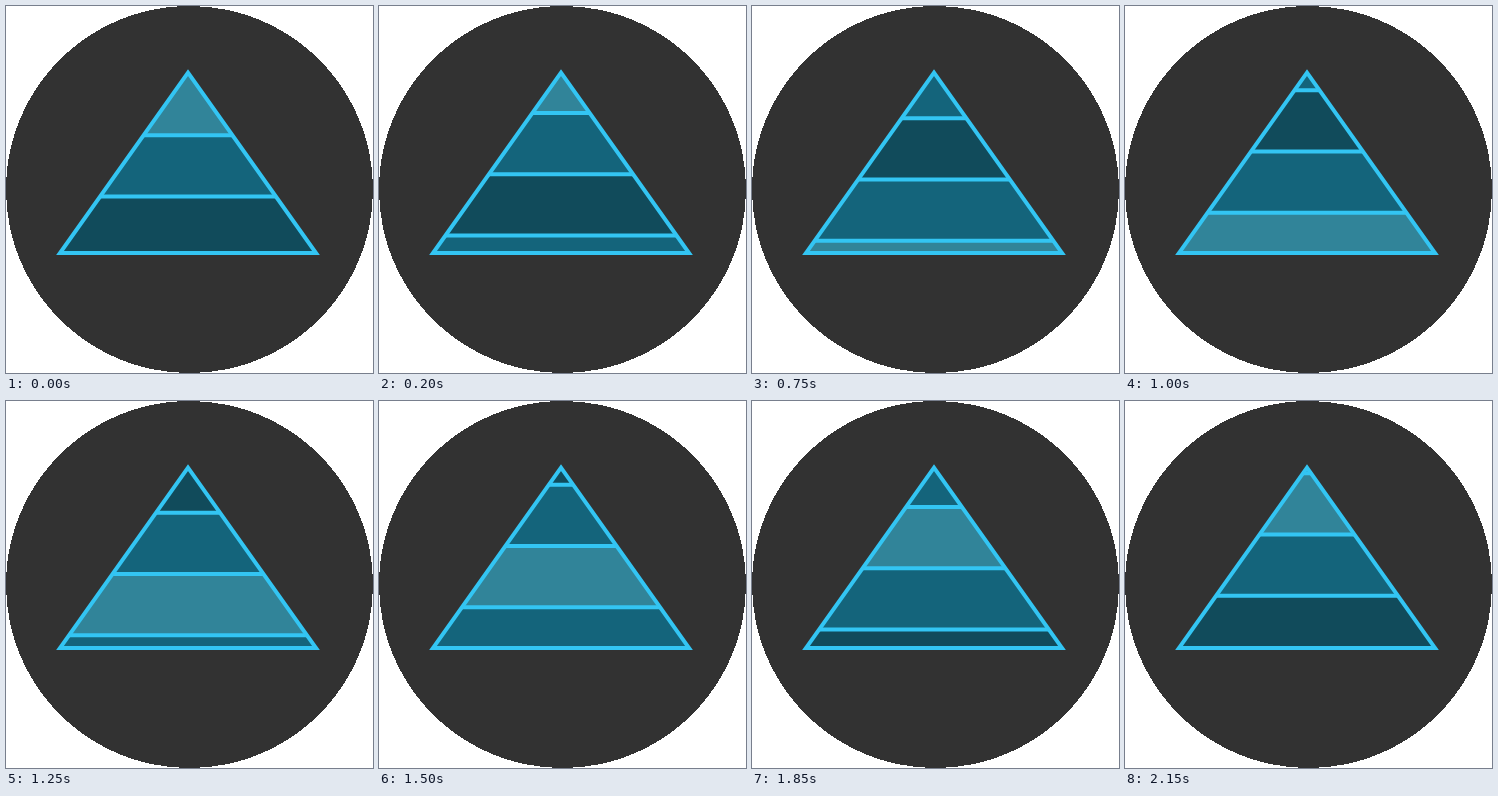
Recreate the animation shown at these times as an HTML page. Size 367 by 367 pixels, loop 2.2 s.

```html
<!DOCTYPE html>
<html lang="en">
<head>
<meta charset="utf-8">
<title>Pyramid</title>
<style>
html, body { margin: 0; width: 100%; height: 100%; overflow: hidden; background: #fff; }
svg { display: block; width: 100vw; height: 100vh; }
</style>
</head>
<body>
<svg viewBox="0 0 367 367">
  <clipPath id="inside"><path d="M182 66.7 310 247H54Z"/></clipPath>
  <circle cx="183.5" cy="183.5" r="183.5" fill="#323232" shape-rendering="crispEdges"/>
  <g clip-path="url(#inside)"><g id="bands"></g></g>
  <path d="M182 66.7 310 247H54Z" fill="none" stroke="#33c5f3" stroke-width="4"/>
</svg>
<script>
const LOOP = 2200, TICK = 50;
const PITCH = 61.25, TOP = 68.1, SPEED = 5.6;
const COLORS = ['#318499', '#14647b', '#114b5b', '#14647b'];
const bands = document.getElementById('bands');

// Two cycles of the four layers, wide enough for the whole triangle
let fills = '', lines = '';
for (let i = 0; i < 8; i++) {
  const y = TOP + i * PITCH;
  fills += `<rect x="50" y="${y}" width="264" height="${PITCH + 0.5}" fill="${COLORS[i % 4]}"/>`;
  lines += `<path d="M50 ${y}H314" stroke="#33c5f3" stroke-width="4"/>`;
}
bands.innerHTML = fills + lines;

function draw(now) {
  const tick = Math.floor(now % LOOP / TICK);
  // The scroll pauses for one tick, then catches up at mid-loop
  const step = tick >= 10 && tick < 23 ? tick - 1 : tick;
  bands.setAttribute('transform', `translate(0 ${-step * SPEED})`);
}

const start = performance.now();
function loop() {
  draw(performance.now() - start);
  requestAnimationFrame(loop);
}
loop();
</script>
</body>
</html>
```
